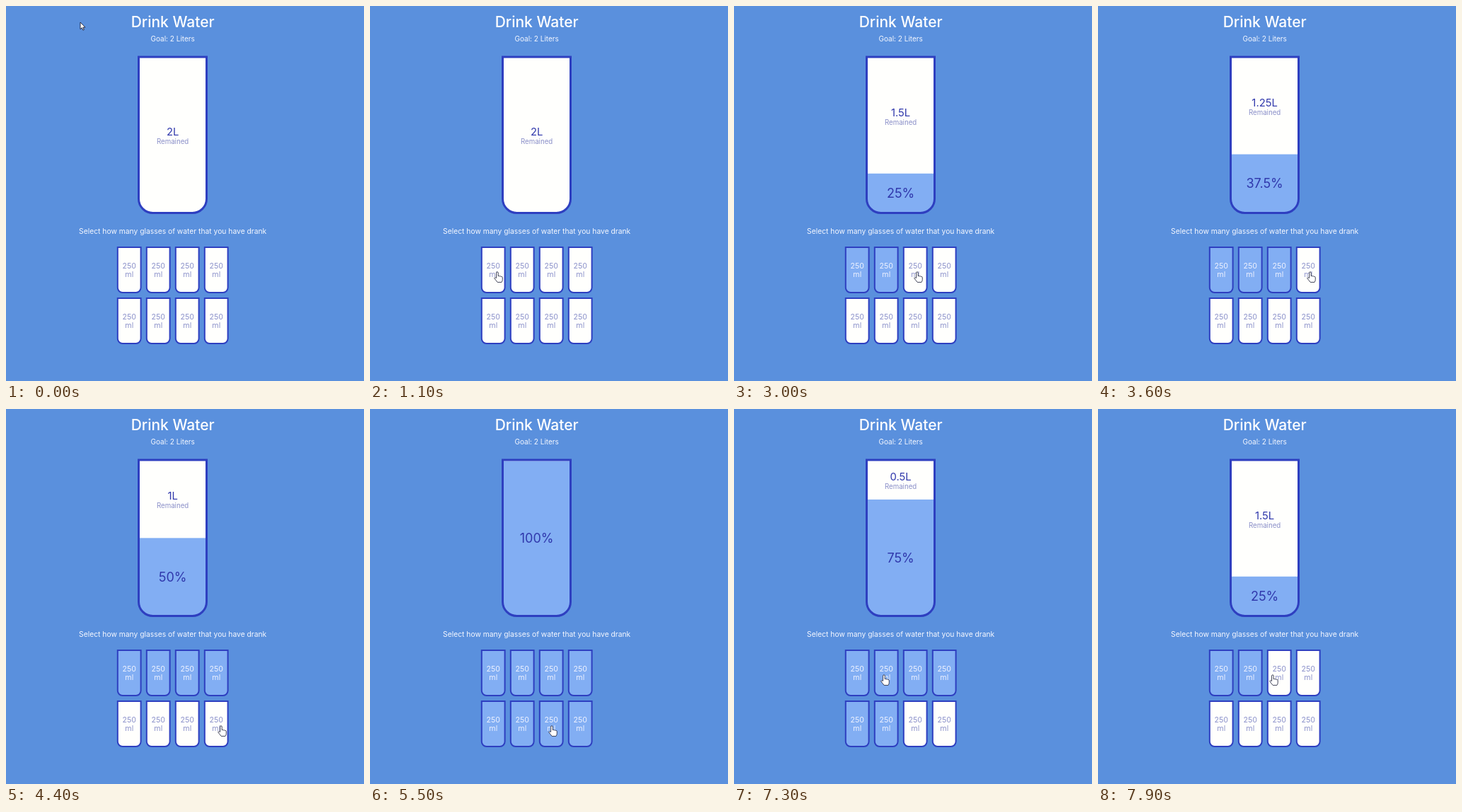
An HTML page that plays this animation: 506x530 px, repeating every 8 s.

```html
<!DOCTYPE html>
<html lang="en">
<head>
<meta charset="utf-8">
<title>Drink Water</title>
<style>
  html, body { margin: 0; width: 100%; height: 100%; overflow: hidden; background: #5a90dd; }
  svg { display: block; font-family: Inter, "Open Sans", sans-serif; text-anchor: middle; }
  .edge { fill: none; stroke: #2e3fc0; }
  .note { fill: #f6f8ff; font-size: 10.3px; }
  .ink { fill: #3038ac; }
</style>
</head>
<body>
<svg width="506" height="530" viewBox="0 0 506 530">
  <defs>
    <path id="bigCup" d="M187.5 72H283.5V272.5a20 20 0 0 1 -20 20H207.5a20 20 0 0 1 -20 -20z"/>
    <clipPath id="inside"><use href="#bigCup"/></clipPath>
  </defs>
  <text x="235.7" y="29.6" fill="#fff" font-size="21" font-weight="500">Drink Water</text>
  <text class="note" x="235.7" y="49.8" style="font-size:10px">Goal: 2 Liters</text>
  <use href="#bigCup" fill="#fffffd"/>
  <g clip-path="url(#inside)">
    <g id="remained">
      <text id="liters" class="ink" x="235.6" font-size="14.8"></text>
      <text id="label" x="235.6" font-size="9.7" fill="#8a8fc8">Remained</text>
    </g>
    <rect id="water" x="187" width="97" fill="#82aef3"/>
    <text id="percent" class="ink" x="235.6" font-size="18"></text>
  </g>
  <use href="#bigCup" class="edge" stroke-width="3"/>
  <text class="note" x="235.7" y="322">Select how many glasses of water that you have drank</text>
  <g id="glasses"></g>
  <g id="cursor" fill="#fff" stroke="#1c2038" stroke-width=".9" stroke-linejoin="round">
    <path id="arrow" d="M0 0V9.8L2.3 7.7 3.9 11.2 5.4 10.5 3.9 7.1H7z"/>
    <path id="hand" transform="scale(.93)" d="M-1.5 9V1.2a1.4 1.4 0 0 1 2.8 0V6.2q1.2 -1 2.4 .3q1.3 -.8 2.3 .5q1.6 -.4 1.8 1.2V11.5q0 2 -1.4 4H.2q-2.6 -3 -4.8 -6.2q.6 -1.6 2.2 -.6z"/>
  </g>
</svg>
<script>
const LOOP = 8000, STEP = 100, FADE = 300;
const TOP = 73.5, BOTTOM = 291.2;
const $ = id => document.getElementById(id);
const mix = (a, b, p) => a + (b - a) * p;
const clamp = p => Math.min(1, Math.max(0, p));
const smooth = p => p * p * (3 - 2 * p);
const mixColor = (a, b, p) => `rgb(${a.map((v, i) => Math.round(mix(v, b[i], p)))})`;

// Each click picks a glass; dx is where the pointer rests across it.
const clicks = [
  { at: 1350, glass: 0, dx: 23 }, { at: 2150, glass: 1, dx: 21 },
  { at: 3050, glass: 2, dx: 20 }, { at: 3950, glass: 3, dx: 20 },
  { at: 4950, glass: 7, dx: 24 }, { at: 5950, glass: 6, dx: 18 },
  { at: 6750, glass: 5, dx: 12 }, { at: 7550, glass: 1, dx: 14 },
  { at: LOOP, glass: 2, dx: 10 }
];

// Picking the last full glass empties it; any other pick fills up to it.
let level = 0;
for (const c of clicks) {
  c.before = level;
  level = c.after = level === c.glass + 1 ? c.glass : c.glass + 1;
}

// CSS "ease": cubic-bezier(.25, .1, .25, 1)
function ease(x) {
  if (x >= 1) return 1;
  let lo = 0, hi = 1, s = 0;
  for (let i = 0; i < 20; i++) {
    s = (lo + hi) / 2;
    if (.75 * s * (1 - s) + s ** 3 < x) lo = s; else hi = s;
  }
  return .3 * s * (1 - s) ** 2 + 3 * s * s * (1 - s) + s ** 3;
}

const glasses = Array.from({ length: 8 }, (_, i) => {
  const x = 157 + i % 4 * 41, y = 340 + (i >> 2) * 72;
  const g = document.createElementNS("http://www.w3.org/2000/svg", "g");
  g.setAttribute("transform", `translate(${x} ${y})`);
  g.innerHTML = `
    <path class="edge" stroke-width="2" d="M.8 1H33.6V58a7 7 0 0 1 -7 7H7.8a7 7 0 0 1 -7 -7z"/>
    <text x="17.3" y="30.9" font-size="10.6">250</text>
    <text x="17.3" y="42.7" font-size="10.6">ml</text>`;
  $("glasses").append(g);
  return { x, y, g, body: g.firstElementChild };
});

const restAt = c => [glasses[c.glass].x + c.dx, glasses[c.glass].y + 36];

function cursorAt(t, now) {
  const to = restAt(clicks[now + 1]);
  if (now < 0) {
    // The first trip swings wide to the lower right.
    const p = smooth(clamp(t / 900)), swing = Math.sin(Math.PI * p);
    return [mix(105, to[0], p) + 150 * swing, mix(23, to[1], p) + 215 * swing];
  }
  const from = restAt(clicks[now]);
  const p = smooth(clamp((t - clicks[now].at - 50) / 350));
  return from.map((v, i) => mix(v, to[i], p));
}

function draw(t) {
  const now = clicks.findLastIndex(c => c.at <= t);
  const { at, before, after } = clicks[now] ?? { at: 0, before: 0, after: 0 };
  const p = ease((t - at) / FADE);

  const surface = mix(BOTTOM, TOP, mix(before, after, p) / 8);
  $("water").setAttribute("y", surface);
  $("water").setAttribute("height", BOTTOM + 4 - surface);
  $("water").style.display = $("percent").style.display = after ? "" : "none";
  $("percent").textContent = after * 12.5 + "%";
  $("percent").setAttribute("y", (surface + BOTTOM) / 2 + 7);

  // The amount left keeps its last value while the final fill hides it.
  const middle = (TOP + surface) / 2;
  $("remained").style.display = after === 8 && p === 1 ? "none" : "";
  $("liters").textContent = 2 - (after === 8 ? before : after) / 4 + "L";
  $("liters").setAttribute("y", middle + .5);
  $("label").setAttribute("y", middle + 12.4);

  glasses.forEach(({ g, body }, i) => {
    const full = mix(i < before, i < after, p);
    body.style.fill = mixColor([255, 255, 253], [130, 174, 243], full);
    g.style.fill = mixColor([138, 144, 202], [240, 243, 255], full);
  });

  const [x, y] = cursorAt(t, now);
  const over = glasses.some(c => x >= c.x && x <= c.x + 34.4 && y >= c.y && y <= c.y + 66);
  $("cursor").setAttribute("transform", `translate(${x} ${y})`);
  $("hand").style.display = over ? "" : "none";
  $("arrow").style.display = over ? "none" : "";
}

function tick() {
  draw(Math.floor(performance.now() % LOOP / STEP) * STEP);
  requestAnimationFrame(tick);
}
tick();
</script>
</body>
</html>
```
